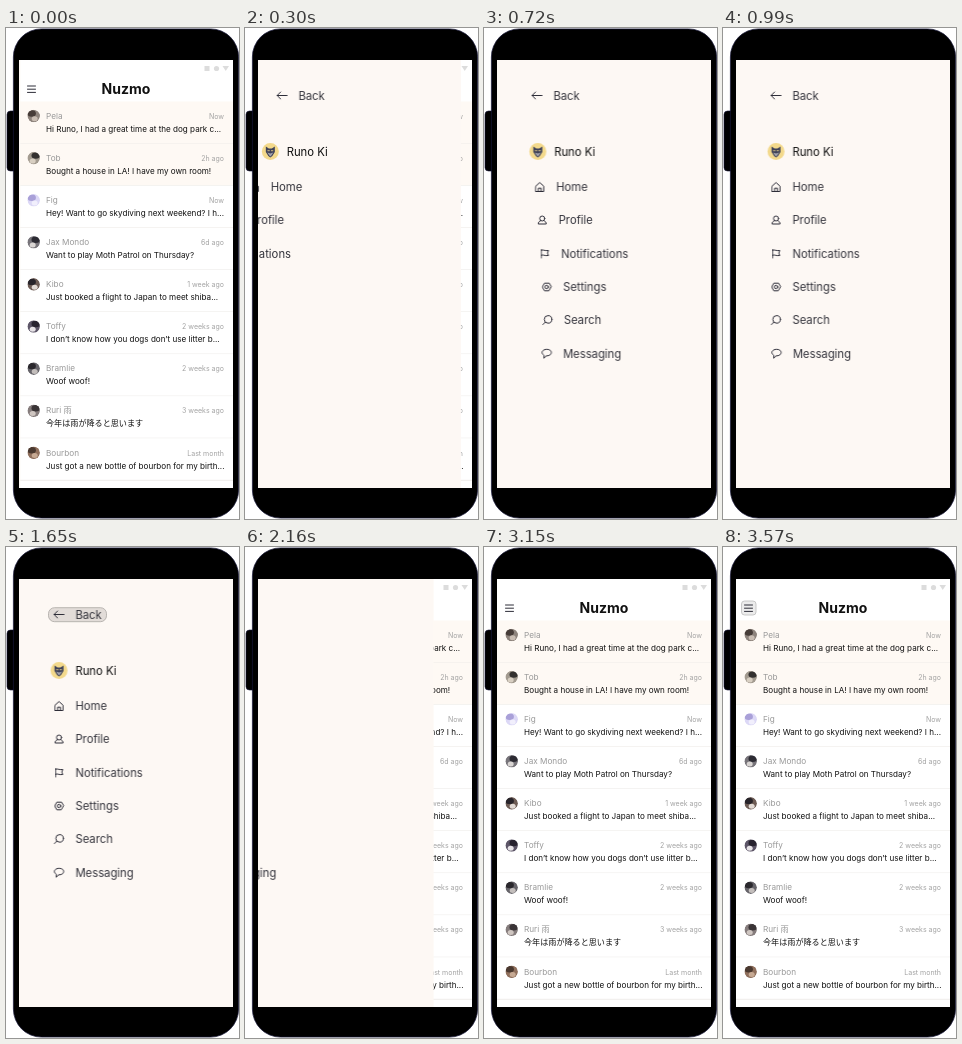
Animation of 233 by 491 pixels, one loop 3.6 s. Source, as an HTML page:

```html
<!DOCTYPE html>
<html lang="en">
<head>
<meta charset="utf-8">
<title>Inbox menu</title>
<style>
  html, body { margin: 0; width: 100%; height: 100%; overflow: hidden; background: #fff; }
  svg { display: block; width: 100%; height: 100%; }
  text { font-family: Inter, "Noto Sans CJK JP", "Noto Sans CJK", sans-serif; }

  .title { font-size: 14px; font-weight: 700; text-anchor: middle; fill: #111; }
  .name { font-size: 8.2px; fill: #999; }
  .time { font-size: 7px; fill: #a2a2a2; text-anchor: end; }
  .msg { font-size: 8.1px; fill: #111; }
  .label { font-size: 11.3px; fill: #34343c; }
  .label.user { fill: #111; }
  .icon { fill: none; stroke: #2d2d38; stroke-width: 1; stroke-linecap: round; stroke-linejoin: round; }

  .panel, .enter, .leave, .tap { animation: 3600ms linear infinite backwards; }
  .panel { animation-name: slide; }
  .enter { animation-name: enter; animation-delay: calc(92ms + var(--i) * 43.5ms); }
  .leave { animation-name: leave; animation-delay: calc(1800ms + var(--i) * 13.5ms); }
  .tap { animation-name: tap; }
  .tap.late { animation-delay: 1800ms; }

  /* thirds on the x axis make each bezier a plain cubic polynomial */
  @keyframes slide {
    0% { transform: translateX(-214px); animation-timing-function: cubic-bezier(.3333, 1, .6667, 1); }
    13.333% { transform: none; }
    50% { transform: none; animation-timing-function: cubic-bezier(.3333, 0, .6667, 0); }
    67.778%, 100% { transform: translateX(-214px); }
  }
  @keyframes enter {
    0% { transform: translateX(-105px); animation-timing-function: cubic-bezier(.3333, 1.5672, .6667, 1); }
    17.5%, 80% { transform: translateX(0); }
    80.01%, 100% { transform: translateX(-105px); }
  }
  @keyframes leave {
    0% { transform: translateX(0); animation-timing-function: cubic-bezier(.3333, 0, .6667, -.5672); }
    8.333%, 30% { transform: translateX(-105px); }
    30.01%, 100% { transform: translateX(0); }
  }
  @keyframes tap {
    0%, 41.5% { opacity: 0; }
    44%, 49.99% { opacity: 1; }
    50%, 100% { opacity: 0; }
  }
</style>
</head>
<body>
<svg viewBox="0 0 233 491" preserveAspectRatio="none">
  <defs>
    <clipPath id="screen"><rect x="13" y="32" width="214" height="428"/></clipPath>
    <clipPath id="round"><circle r="6.3"/></clipPath>
  </defs>

  <rect x="1" y="83" width="12" height="60" rx="3.5" fill="#000" stroke="#17173a" stroke-width=".6"/>
  <rect x="7.4" y=".9" width="225.2" height="489.2" rx="28" fill="#000" stroke="#17173a" stroke-width=".7"/>

  <g clip-path="url(#screen)">
    <rect x="13" y="32" width="214" height="428" fill="#fff"/>
    <g fill="#dcdcdc">
      <rect x="198.500" y="38" width="5" height="5"/>
      <circle cx="210.500" cy="40.500" r="2.600"/>
      <path d="M216.500 38h6.500l-3.250 5z"/>
    </g>
    <rect class="tap late" x="18.500" y="54" width="14.500" height="14" rx="3" fill="#ececec" stroke="#bdbdbd" stroke-width=".8"/>
    <path class="icon" d="M21.500 58h8M21.500 61.200h8M21.500 64.400h8"/>
    <text class="title" x="120" y="66.300">Nuzmo</text>
    <g id="rows"></g>

    <g class="panel">
      <rect x="13" y="32" width="214" height="428" fill="#fdf8f4"/>
      <g id="menu"></g>
    </g>
  </g>
</svg>

<script>
  // name, time, message, avatar colours: ground, shade, light
  const rows = [
    ['Pela', 'Now', 'Hi Runo, I had a great time at the dog park c...', '#8d837c', '#463c38', '#c9bdb3'],
    ['Tob', '2h ago', 'Bought a house in LA! I have my own room!', '#a39b90', '#33302f', '#d8cfc2'],
    ['Fig', 'Now', 'Hey! Want to go skydiving next weekend? I h...', '#dcd8f6', '#a9a0d8', '#f1effc'],
    ['Jax Mondo', '6d ago', 'Want to play Moth Patrol on Thursday?', '#77747a', '#2c2b33', '#d9d5d3'],
    ['Kibo', '1 week ago', 'Just booked a flight to Japan to meet shiba...', '#6d5c55', '#28242a', '#e2dad5'],
    ['Toffy', '2 weeks ago', 'I don’t know how you dogs don’t use litter b...', '#5d5668', '#27232f', '#e6e2e6'],
    ['Bramlie', '2 weeks ago', 'Woof woof!', '#66646a', '#2a282d', '#c3bebc'],
    ['Ruri 雨', '3 weeks ago', '今年は雨が降ると思います', '#857c7c', '#3a3436', '#cfc6c1'],
    ['Bourbon', 'Last month', 'Just got a new bottle of bourbon for my birth...', '#8f6f5c', '#4a3930', '#c7aa94']
  ];

  // label, centre line, icon around (53, centre)
  const arrow = '<path d="M5 0H-5M-1.500-3.500L-5 0l3.500 3.500"/>';
  const face = `<g stroke="none"><circle r="8.500" fill="#f3d98c"/>
    <path d="M-4.500-5l3 2h3l3-2v5.500L2 4.500 0 6-2 4.500-4.500.5z" fill="#3f4258"/>
    <path d="M-3 1l3 1 3-1-2 3-1 1-1-1z" fill="#a5a5ad"/>
    <path d="M-2.500-.8h1.500M1-.8h1.500" stroke="#f3d98c" stroke-width=".8"/></g>`;
  const hexagon = r => Array.from({ length: 6 }, (_, k) =>
    `${(r * Math.cos(k * Math.PI / 3)).toFixed(2)},${(r * Math.sin(k * Math.PI / 3)).toFixed(2)}`).join(' ');
  const items = [
    ['Back', 67.5, arrow],
    ['Runo Ki', 123.5, face],
    ['Home', 159, '<path d="M-4-.8L0-4.500 4-.8V4.500H-4zM-1.400 4.500V1.200h2.800v3.300"/>'],
    ['Profile', 192, '<circle cy="-1.500" r="2.500"/><path d="M-1.500.6C-3.400 1.200-4 2.600-4 4h8C4 2.600 3.400 1.200 1.500.6"/>'],
    ['Notifications', 225.5, '<path d="M-3.500 4.500v-8.500M-3.500-3.300C-1.500-4.300 0-2.300 3.800-3L2.800-.4l1 2.400C0 2.700-1.500.7-3.500 1.700"/>'],
    ['Settings', 259, `<polygon points="${hexagon(4.4)}"/><circle r="1.700"/>`],
    ['Search', 292, '<circle cx=".6" cy="-.6" r="3.800"/><path d="M-2.200 2.200L-4.600 4.600"/>'],
    ['Messaging', 325.5, '<path d="M-2.800 4.300L-2.600 1.900C-7-1 -3.500-4.200 0-4.200 6.500-4.200 6 2.600 0 2.400z"/>']
  ];

  const rowSvg = ([name, time, msg, ground, shade, light], i) => {
    const top = 73.5 + 42.1 * i;
    const side = i % 2 ? 1 : -1;
    return `<g transform="translate(0 ${top.toFixed(1)})">
      <rect x="13" width="214" height="42.100" fill="${i < 2 ? '#fef9f4' : '#fff'}"/>
      <path d="M13 42h214" stroke="#eeebe8" stroke-width=".9"/>
      <g transform="translate(27.700 14.500)" clip-path="url(#round)">
        <circle r="6.300" fill="${ground}"/>
        <ellipse cx="${side * 2}" cy="-2.500" rx="4.200" ry="3.200" fill="${shade}"/>
        <ellipse cx="${-side}" cy="2.800" rx="3" ry="2.500" fill="${light}"/>
      </g>
      <text class="name" x="40" y="17.300">${name}</text>
      <text class="time" x="218" y="17.300">${time}</text>
      <text class="msg" x="40" y="30.300">${msg}</text>
    </g>`;
  };

  const itemSvg = ([label, y, icon], i) => `<g class="enter" style="--i:${i}"><g class="leave">
      ${i ? '' : '<rect class="tap" x="42.500" y="60.700" width="58" height="14" rx="6" fill="#e2dcd8" stroke="#aaa6a3" stroke-width=".8"/>'}
      <g class="icon" transform="translate(53 ${y})">${icon}</g>
      <text class="label${i === 1 ? ' user' : ''}" x="69.300" y="${y + 4}">${label}</text>
    </g></g>`;

  document.getElementById('rows').innerHTML = rows.map(rowSvg).join('');
  document.getElementById('menu').innerHTML = items.map(itemSvg).join('');
</script>
</body>
</html>
```
